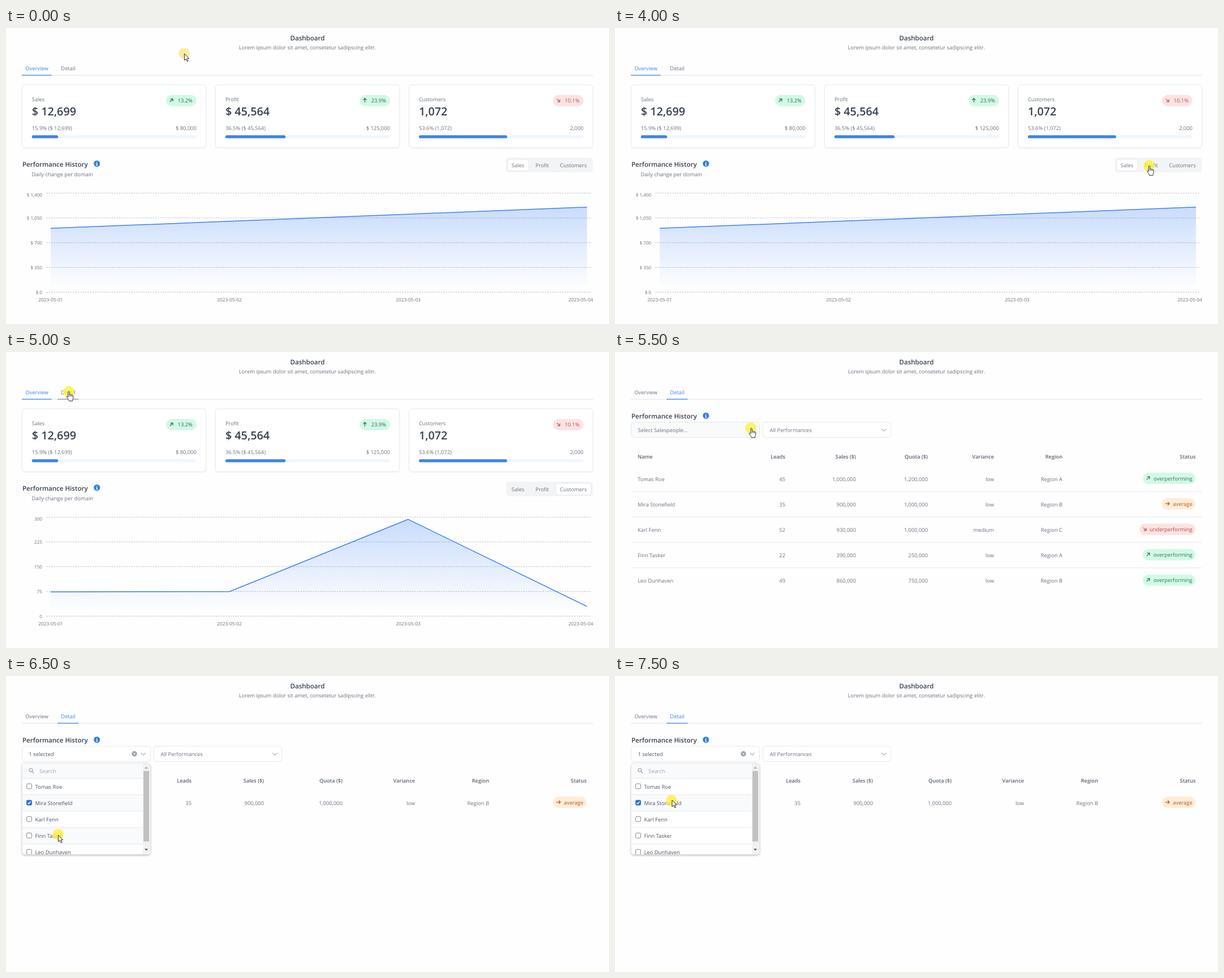
Animation of 1066x525 px, one loop 8000 ms. Source, as an HTML page:

```html
<!DOCTYPE html>
<html lang="en">
<head>
<meta charset="utf-8">
<title>Dashboard</title>
<style>
html, body { margin: 0; width: 100%; height: 100%; overflow: hidden; background: #fefefe; }
svg { display: block; width: 1066px; height: 525px; font-family: "Open Sans", sans-serif; text-rendering: geometricPrecision; }
</style>
</head>
<body>
<svg id="stage" viewBox="0 0 1066 525" xmlns="http://www.w3.org/2000/svg"></svg>
<script>
const LOOP = 8000;
const BLUE = '#3b82f6', GRAY = '#6b7280', DARK = '#374151', LINE = '#e5e7eb';
const stage = document.getElementById('stage');

// Each step is one state of the page; it holds until the next one starts.
const steps = [
  { at: 0, chart: 'Sales', cursor: ['arrow', 315, 45, 315, 45, '#fde684'] },
  { at: 500, chart: 'Sales', cursor: ['arrow', 347.5, 116] },
  { at: 4000, chart: 'Sales', cursor: ['hand', 940, 244, 944, 244] },
  { at: 4500, chart: 'Profit', cursor: ['hand', 999, 244, 1003, 244] },
  { at: 5000, chart: 'Customers', hoverTab: true, cursor: ['hand', 106.5, 69.5, 111, 70] },
  { at: 5500, detail: true, hoverBox: true, cursor: ['hand', 236.5, 134.5, 240, 135] },
  { at: 6000, detail: true, open: true, hover: 1, cursor: ['arrow', 100.5, 219.5, 100, 221] },
  { at: 6500, detail: true, open: true, picked: [1], hover: 3, cursor: ['arrow', 92, 281.5, 92, 281] },
  { at: 7000, detail: true, open: true, picked: [1, 3], hover: 3, cursor: ['arrow', 92, 281.5, 92, 281] },
  { at: 7500, detail: true, open: true, picked: [1], hover: 1, cursor: ['arrow', 100.5, 219.5, 100, 221] }
];

const charts = {
  Sales: { max: 1400, unit: '$ ', data: [900.73, 1000.74, 1100.93, 1200.9], pill: [886.5, 37.5] },
  Profit: { max: 300, unit: '$ ', data: [173, 174.6, 293.1, 290.2], pill: [929, 38] },
  Customers: { max: 300, unit: '', data: [73, 74, 293, 29], pill: [972, 62] }
};

const people = [
  ['Tomas Roe', '45', '1,000,000', '1,200,000', 'low', 'Region A', 'overperforming'],
  ['Mira Stonefield', '35', '900,000', '1,000,000', 'low', 'Region B', 'average'],
  ['Karl Fenn', '52', '930,000', '1,000,000', 'medium', 'Region C', 'underperforming'],
  ['Finn Tasker', '22', '390,000', '250,000', 'low', 'Region A', 'overperforming'],
  ['Leo Dunhaven', '49', '860,000', '750,000', 'low', 'Region B', 'overperforming']
];

// Badge look: background, text colour, turn of the arrow, width in the table
const looks = {
  overperforming: ['#d1fae5', '#2f7563', 0, 93],
  average: ['#ffedd5', '#b4532f', 45, 59],
  underperforming: ['#fee2e2', '#b5484c', 90, 99]
};

const text = (x, y, s, { size = 9.37, fill = GRAY, anchor = 'start', weight = 400 } = {}) =>
  `<text x="${x}" y="${y}" font-size="${size}" fill="${fill}" text-anchor="${anchor}" font-weight="${weight}">${s}</text>`;
const rect = (x, y, w, h, r, fill, stroke = 'none') =>
  `<rect x="${x}" y="${y}" width="${w}" height="${h}" rx="${r}" fill="${fill}" stroke="${stroke}"/>`;
const path = (d, stroke, width = 1, extra = '') =>
  `<path d="${d}" fill="none" stroke="${stroke}" stroke-width="${width}" ${extra}/>`;
const title = (x, y, s, anchor) => text(x, y, s, { size: 11.55, fill: DARK, weight: 600, anchor });
const chevron = x => path(`M${x - 4} 136.3l4 4 4-4`, '#9ca3af', 1.1);

function info(y) {
  return `<circle cx="160.7" cy="${y}" r="5.5" fill="#2f7fe6"/>` +
    path(`M160.7 ${y - 3}v1.4M159.5 ${y - .4}h1.2v3.2M159.2 ${y + 2.8}h3`, '#fff', 1.2);
}

function badge(x, y, w, label, [bg, ink, turn], pad) {
  return rect(x, y - 10, w, 20, 10, bg) +
    path('M-2.6 2.6L2.6-2.6M-1.8-2.6H2.6V1.8', ink, 1.2, `transform="translate(${x + 9.5} ${y - .3}) rotate(${turn})"`) +
    text(x + w - pad, y + 3.6, label, { fill: ink, anchor: 'end' });
}

function header({ detail, hoverTab }) {
  const tab = (x, s, on) => text(x, 75, s, { fill: on ? BLUE : GRAY, anchor: 'middle' });
  return title(533, 22, 'Dashboard', 'middle') +
    text(533, 37.8, 'Lorem ipsum dolor sit amet, consetetur sadipscing elitr.', { anchor: 'middle' }) +
    path('M28 83.8H1038', LINE, 1.2) +
    tab(54.5, 'Overview', !detail) + tab(110, 'Detail', detail) +
    (detail ? path('M91 83.7H128.5', BLUE, 1.3) : path('M28 83.7H80.5', BLUE, 1.3)) +
    (hoverTab ? path('M91 83.7H128.5', '#8b919c', 1.2) : '');
}

function card(x, name, value, part, goal, share, rate, turn) {
  const left = x + 17.6, right = x + 308.6, barW = 291;
  const look = turn === 90 ? ['#fee2e2', '#a0615c', 90] : ['#d1fae5', '#3b625c', turn];
  return rect(x + .2, 101.2, 325.3, 111.8, 5, 'none', '#f1f2f4') +
    rect(x, 100.8, 325.5, 111.7, 5, '#fff', LINE) +
    text(left, 130, name) +
    text(left, 154.7, value, { size: 19.8, fill: DARK, weight: 600 }) +
    text(left, 180.7, part) + text(right, 180.7, goal, { anchor: 'end' }) +
    rect(left, 190.3, barW, 5.2, 2.6, '#eff6ff') + rect(left, 190.3, barW * share, 5.2, 2.6, BLUE) +
    badge(right - 54, 128.7, 54, rate, look, 7);
}

function chart(name) {
  const { max, unit, data, pill } = charts[name];
  const pts = data.map((v, i) => `${79 + i * 316} ${(468.3 - v / max * 175.6).toFixed(1)}`).join('L');
  let out = rect(884, 230, 153.5, 26, 5, '#f3f4f6') + rect(pill[0], 233, pill[1], 20.5, 4, '#fff', LINE);
  [['Sales', 905], ['Profit', 948], ['Customers', 1003]].forEach(([s, x]) => {
    out += text(x, 246.8, s, { anchor: 'middle' });
  });
  for (let i = 0; i < 5; i++) {
    const y = 468.5 - i * 43.9, value = (max * i / 4).toLocaleString('en-US');
    out += path(`M71.5 ${y}H1035`, '#a9aeb7', .9, 'stroke-dasharray="2.14 2.14"') +
      text(64, y + (i === 4 ? 6 : 3), unit + value, { size: 8.1, anchor: 'end' });
  }
  for (let i = 0; i < 4; i++) {
    out += text(i === 3 ? 1016 : 79 + i * 316, 484.8, '2023-05-0' + (i + 1), { size: 8.4, anchor: 'middle' });
  }
  return out + `<path d="M${pts}V468.3H79Z" fill="url(#fade)"/>` +
    path('M' + pts, BLUE, 1.5, 'stroke-linejoin="round"');
}

function overview(s) {
  return card(28.2, 'Sales', '$ 12,699', '15.9% ($ 12,699)', '$ 80,000', .159, '13.2%', 0) +
    card(370.3, 'Profit', '$ 45,564', '36.5% ($ 45,564)', '$ 125,000', .365, '23.9%', -45) +
    card(712.3, 'Customers', '1,072', '53.6% (1,072)', '2,000', .536, '10.1%', 90) +
    title(29, 245.8, 'Performance History') + info(240.5) +
    text(45.5, 263.3, 'Daily change per domain') + chart(s.chart);
}

// Right edges of the number columns depend on which rows are shown.
function columns(picked) {
  if (!picked) return [301, 426, 553, 670, 791];
  return picked.length === 1 ? [328, 456, 595, 723, 854] : [306, 426, 554.5, 674, 797.5];
}

function table(picked) {
  const edges = columns(picked), rows = picked ? picked.map(i => people[i]) : people;
  const heads = ['Leads', 'Sales ($)', 'Quota ($)', 'Variance', 'Region'];
  const head = { size: 9.2, fill: '#5b6472', weight: 600 };
  let out = text(40, 189, 'Name', head) + text(1026.5, 189, 'Status', { ...head, anchor: 'end' });
  heads.forEach((s, i) => { out += text(edges[i], 189, s, { ...head, anchor: 'end' }); });
  rows.forEach((row, r) => {
    const y = 225 + r * 45.15, look = looks[row[6]];
    if (r) out += path(`M28.5 ${y - 22.7}H1038`, LINE);
    out += text(40, y + 3.6, row[0]);
    edges.forEach((x, i) => { out += text(x, y + 3.6, row[i + 1], { anchor: 'end' }); });
    out += badge(1026 - look[3], y - .9, look[3], row[6], look, 5.3);
  });
  return out;
}

function menu({ picked = [], hover }) {
  let rows = '';
  people.forEach(([name], i) => {
    const y = 181.5 + i * 29.1, on = picked.includes(i);
    if (on || hover === i) rows += rect(29, y, 213, 29, 0, '#f9fafb');
    rows += path(`M29 ${y}H242`, LINE) +
      rect(36.6, y + 9.7, 8.8, 8.8, 1.6, on ? '#2878d8' : '#fff', on ? '#2878d8' : '#81858c') +
      (on ? path(`M38.5 ${y + 14.2}l1.9 2 3.3-4.2`, '#fff', 1.3) : '') +
      text(51.5, y + 18.1, name, { fill: '#4b5563' });
  });
  return rect(28.5, 154.5, 227, 162, 5, '#fff', LINE).replace('/>', ' filter="url(#shadow)"/>') +
    `<g clip-path="url(#panel)">${rect(29, 155, 213, 26.5, 0, '#f9fafb')}${rows}` +
    rect(242, 155, 13, 162, 0, '#f1f1f1') + rect(243, 168.5, 10, 125, 0, '#c1c1c1') +
    '<path d="M245 164.2l3-3.2 3 3.2Z" fill="#a3a3a3"/><path d="M245 306.5l3 3.2 3-3.2Z" fill="#505050"/></g>' +
    '<circle cx="43.9" cy="167" r="2.9" fill="none" stroke="#9ca3af" stroke-width="1.2"/>' +
    path('M46 169.2l3.2 3.2', '#9ca3af', 1.3) + text(59, 171.6, 'Search', { fill: '#9ca3af' });
}

function detail(s) {
  let out = title(29, 118.2, 'Performance History') + info(113) + table(s.picked) +
    rect(28.5, 124.5, 227, 27, 5, s.hoverBox ? '#f9fafb' : '#fff', LINE) +
    rect(261.2, 124.5, 226.5, 27, 5, '#fff', LINE) +
    text(273.5, 141.8, 'All Performances') + chevron(475.3) + chevron(242.8);
  if (s.picked) {
    out += text(40.5, 141.8, s.picked.length + ' selected', { fill: '#4b5563' }) +
      '<circle cx="227" cy="138" r="4.7" fill="#9ca3af"/>' + path('M225.4 136.4l3.2 3.2m0-3.2l-3.2 3.2', '#fff', 1);
  } else {
    out += text(40.5, 141.8, 'Select Salespeople...');
  }
  return out + (s.open ? menu(s) : '');
}

function pointer([kind, x, y, hx, hy, tint = '#fdf13c']) {
  const shape = kind === 'arrow'
    ? 'M.4.6V12.4L3.1 9.9 5.1 14.3 7 13.5 5.1 9.2H8.6Z'
    : 'M3.4 1.7C3.4.2 5.7.2 5.7 1.7V6.3C6.3 5.5 7.7 5.7 7.9 6.7 8.6 6 9.9 6.3 10 7.3 10.8 6.7 12.2 7.1 12.2 8.3V11.8C12.2 13.6 10.9 14.6 10.9 17.4H4.9C4.9 15.5 3.2 14.2 1 10.9.2 9.6 1.6 8.5 2.6 9.5L3.4 10.4Z';
  const halo = hx ? `<circle cx="${hx}" cy="${hy}" r="9.8" fill="${tint}" opacity=".8"/>` : '';
  const knuckles = kind === 'hand' ? path('M5.7 6.3V9.5M7.9 6.7V9.6M10 7.3V9.8', '#333', .8) : '';
  return `${halo}<g transform="translate(${x} ${y})"><path d="${shape}" fill="#fff" stroke="#222" stroke-width=".95" stroke-linejoin="round"/>${knuckles}</g>`;
}

const defs = `<defs>
<linearGradient id="fade" x1="0" y1="0" x2="0" y2="1">
<stop offset=".05" stop-color="${BLUE}" stop-opacity=".26"/><stop offset=".95" stop-color="${BLUE}" stop-opacity="0"/>
</linearGradient>
<clipPath id="panel"><rect x="29" y="155" width="226" height="161" rx="4.5"/></clipPath>
<filter id="shadow" x="-10%" y="-10%" width="120%" height="120%"><feDropShadow dx="0" dy="1.5" stdDeviation="1.5" flood-opacity=".25"/></filter>
</defs>`;

let shown = null;
function draw(now) {
  const t = now % LOOP;
  const s = steps.filter(step => step.at <= t).pop();
  if (s !== shown) {
    shown = s;
    stage.innerHTML = defs + rect(0, 0, 1066, 525, 0, '#fefefe') + header(s) +
      (s.detail ? detail(s) : overview(s)) + pointer(s.cursor);
  }
}

const start = performance.now();
function tick() {
  draw(performance.now() - start);
  requestAnimationFrame(tick);
}
tick();
</script>
</body>
</html>
```
